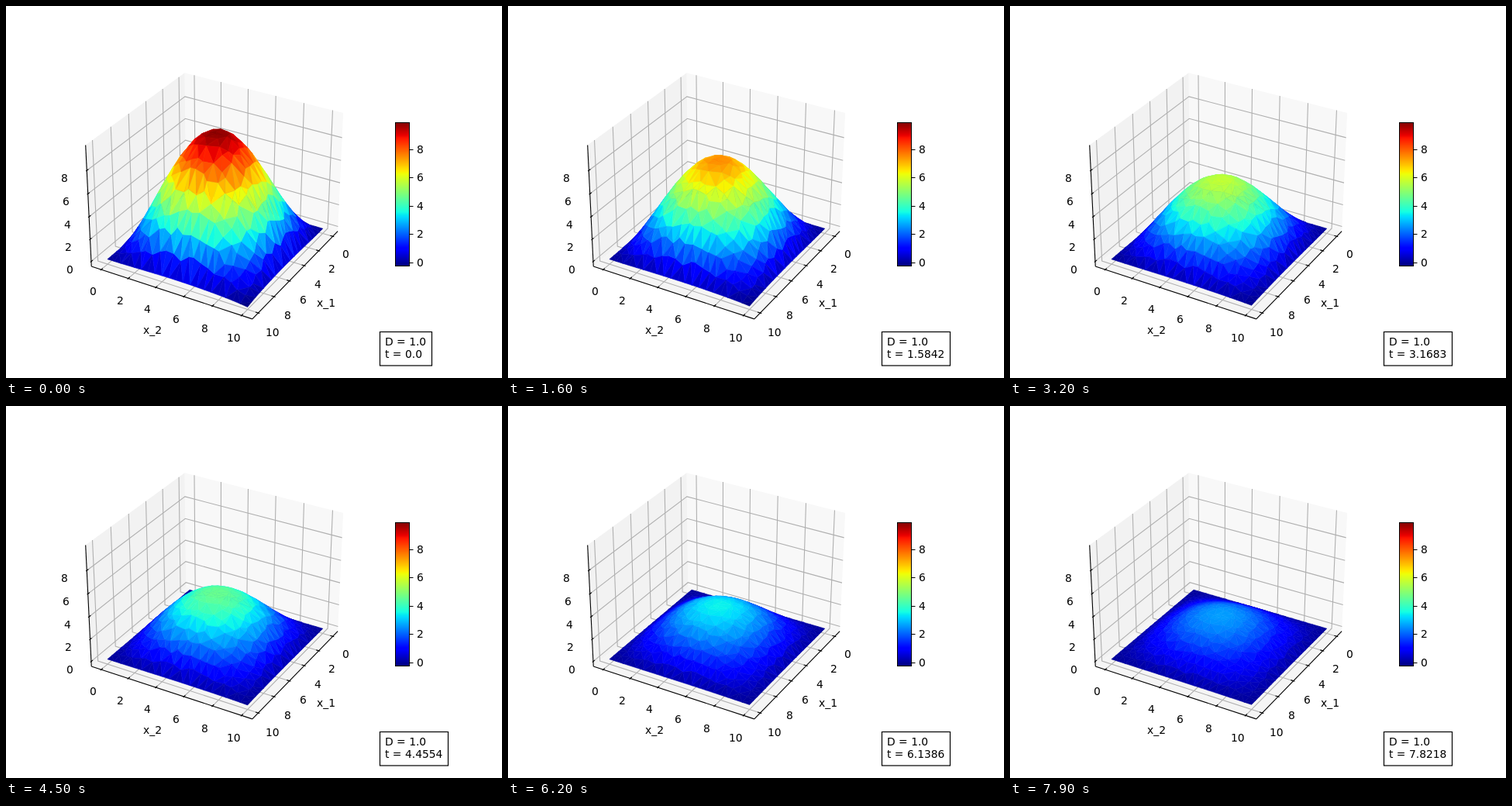
Write an HTML page with a canvas that moves like this. It is 640x480 px and loops after 8000 ms.

```html
<!DOCTYPE html>
<html lang="en">
<head>
<meta charset="utf-8">
<title>Diffusion surface</title>
<style>
  html, body { margin: 0; width: 640px; height: 480px; overflow: hidden; background: #fff; }
  svg, canvas { position: absolute; left: 0; top: 0; display: block; }
  text { font: 13.89px "DejaVu Sans", sans-serif; fill: #000; white-space: pre; }
</style>
</head>
<body>
<svg id="plot" width="640" height="480" viewBox="0 0 640 480"></svg>
<canvas id="surface" width="640" height="480"></canvas>
<script>
const LOOP = 8000, STEP = 100, DT = 10 / 101;
const Z_MIN = -0.24, Z_MAX = 9.92, Z_SPAN = Z_MAX - Z_MIN;
const SIDE = 8 / 7, HEIGHT = 6 / 7;             // box proportions 4 : 4 : 3
const H = SIDE / 2 * 25 / 24, HZ = HEIGHT / 2 * 25 / 24;
const CX = 272.1, CY = 237.4, SCALE = 1997.8;

// ---- projection: elevation 30, azimuth 30, eye distance 10
const C = Math.sqrt(3) / 2;
function project(x, y, z) {
  const depth = 10 - (C * C * x + C / 2 * y + z / 2);
  return [
    CX + SCALE * (C * y - x / 2) / depth,
    CY - SCALE * (C * z - C / 2 * x - y / 4) / depth,
    depth
  ];
}
const boxXY = v => (v - 5) / 11 * SIDE;         // limits -0.5 to 10.5
const boxZ = v => ((v - Z_MIN) / Z_SPAN - 0.5) * HEIGHT;

// ---- jet colour map
const JET = [
  [[0, 0], [0.35, 0], [0.66, 1], [0.89, 1], [1, 0.5]],
  [[0, 0], [0.125, 0], [0.375, 1], [0.64, 1], [0.91, 0], [1, 0]],
  [[0, 0.5], [0.11, 1], [0.34, 1], [0.65, 0], [1, 0]]
];
function ramp(stops, f) {
  let i = 1;
  while (i < stops.length - 1 && f > stops[i][0]) i++;
  const [a, va] = stops[i - 1], [b, vb] = stops[i];
  return va + (vb - va) * (f - a) / (b - a);
}
function jet(value) {
  const f = Math.min(1, Math.max(0, (value - Z_MIN) / Z_SPAN));
  return `rgb(${JET.map(s => Math.round(255 * ramp(s, f)))})`;
}

// ---- static drawing
const svg = document.getElementById('plot');
function add(tag, attrs, text) {
  const el = document.createElementNS('http://www.w3.org/2000/svg', tag);
  for (const k in attrs) el.setAttribute(k, attrs[k]);
  if (text !== undefined) el.textContent = text;
  svg.appendChild(el);
  return el;
}
const path = pts => pts.map(p => project(...p).slice(0, 2).map(v => v.toFixed(2)).join()).join(' ');
const line = (pts, stroke) =>
  add('polyline', { points: path(pts), fill: 'none', stroke, 'stroke-width': 1.11 });
const pane = (pts, fill) => add('polygon', { points: path(pts), fill });
const label = (x, y, text) => add('text', { x, y }, text);

// Text centred on a point in the box, snapped to whole pixels.
function label3d(point, drop, text) {
  const [x, y] = project(...point);
  const el = label(0, Math.round(y + drop), text);
  el.setAttribute('x', Math.round(x - el.getComputedTextLength() / 2));
}

function drawAxes() {
  pane([[-H, -H, -HZ], [-H, H, -HZ], [-H, H, HZ], [-H, -H, HZ]], '#f8f8f8');
  pane([[-H, -H, -HZ], [H, -H, -HZ], [H, -H, HZ], [-H, -H, HZ]], '#f2f2f2');
  pane([[-H, -H, -HZ], [H, -H, -HZ], [H, H, -HZ], [-H, H, -HZ]], '#f5f5f5');

  const ticks = [0, 2, 4, 6, 8, 10], grey = '#b0b0b0';
  for (const t of ticks) {
    const p = boxXY(t);
    line([[p, H, -HZ], [p, -H, -HZ], [p, -H, HZ]], grey);
    line([[H, p, -HZ], [-H, p, -HZ], [-H, p, HZ]], grey);
    if (t < 10) line([[H, -H, boxZ(t)], [-H, -H, boxZ(t)], [-H, H, boxZ(t)]], grey);
  }

  line([[H, H, -HZ], [-H, H, -HZ]], '#000');
  line([[H, -H, -HZ], [H, H, -HZ]], '#000');
  line([[H, -H, -HZ], [H, -H, HZ]], '#000');

  const out = H + SIDE / 120, inn = H - SIDE / 60;
  const away = k => [H + k * SIDE / 12, -HZ - k * HEIGHT / 12];
  const [far, low] = away(1.037), [nameFar, nameLow] = away(2.255);
  for (const t of ticks) {
    const p = boxXY(t), z = boxZ(t);
    line([[p, out, -HZ], [p, inn, -HZ]], '#000');
    line([[out, p, -HZ], [inn, p, -HZ]], '#000');
    label3d([p, far, low], 11, t);
    label3d([far, p, low], 11, t);
    if (t < 10) {
      line([[out, -H, z], [inn, -H, z]], '#000');
      label3d([far, -far, z], 11, t);
    }
  }
  label3d([0, nameFar, nameLow], 4.5, 'x_1');
  label3d([nameFar, 0, nameLow], 4.5, 'x_2');
}

function drawColorbar() {
  const top = 150, bottom = 335, size = bottom - top;
  for (let y = top; y < bottom; y++) {
    const value = Z_MAX - (y + 0.5 - top) / size * Z_SPAN;
    add('rect', { x: 502, y, width: 18, height: 1, fill: jet(value), 'shape-rendering': 'crispEdges' });
  }
  add('rect', { x: 502.5, y: 150.5, width: 18, height: 185, fill: 'none', stroke: '#000' });
  for (let v = 0; v <= 8; v += 2) {
    const row = Math.round(bottom - (v - Z_MIN) / Z_SPAN * size);
    add('line', { x1: 520.5, x2: 525.5, y1: row + 0.5, y2: row + 0.5, stroke: '#000' });
    label(530, row + 5, v);
  }
}

drawAxes();
drawColorbar();
const frameBox = add('rect', { x: 482.5, y: 420.5, height: 43.5, fill: '#fff', stroke: '#000', 'stroke-width': 1.2 });
const infoD = label(489, 438, 'D = 1.0');
const infoT = label(489, 454, '');

// ---- triangulated mesh
let seed = 11;
function rand() {
  seed = (seed * 16807) % 2147483647;
  return seed / 2147483647;
}

// Square rings from the border inwards, each slightly more irregular.
function makePoints() {
  const pts = [], rowGap = 0.56, spacing = 0.5;
  for (let k = 0; k < 9; k++) {
    const half = 5 - k * rowGap, n = Math.round(2 * half / spacing);
    const wobble = k && 0.08 + 0.02 * k;
    const shake = () => (rand() - 0.5) * 2 * wobble;
    for (let i = 0; i < n; i++) {
      const a = -half + 2 * half * i / n;
      for (const [x, y] of [[a, -half], [half, a], [-a, half], [-half, -a]])
        pts.push([5 + x + shake(), 5 + y + shake()]);
    }
  }
  pts.push([5.03, 4.98]);
  return pts;
}

function circle(pts, a, b, c) {
  const [ax, ay] = pts[a];
  const bx = pts[b][0] - ax, by = pts[b][1] - ay;
  const cx = pts[c][0] - ax, cy = pts[c][1] - ay;
  const d = 2 * (bx * cy - by * cx), bb = bx * bx + by * by, cc = cx * cx + cy * cy;
  const ux = (cy * bb - by * cc) / d, uy = (bx * cc - cx * bb) / d;
  return { v: [a, b, c], x: ax + ux, y: ay + uy, r: ux * ux + uy * uy };
}

// Bowyer-Watson Delaunay triangulation
function triangulate(points) {
  const n = points.length;
  const pts = points.concat([[-3000, -2000], [3100, -2100], [40, 4000]]);
  let tris = [circle(pts, n, n + 1, n + 2)];
  for (let p = 0; p < n; p++) {
    const [x, y] = pts[p], rim = new Map(), keep = [];
    for (const t of tris) {
      if ((x - t.x) ** 2 + (y - t.y) ** 2 >= t.r) { keep.push(t); continue; }
      t.v.forEach((a, i) => {
        const b = t.v[(i + 1) % 3], key = Math.min(a, b) * 1000 + Math.max(a, b);
        rim.has(key) ? rim.delete(key) : rim.set(key, [a, b]);
      });
    }
    for (const [a, b] of rim.values()) keep.push(circle(pts, a, b, p));
    tris = keep;
  }
  return tris.map(t => t.v).filter(v => Math.max(...v) < n);
}

const points = makePoints();
const triangles = triangulate(points);

// ---- decaying concentration, with a faint early ripple at the near edges
function level(x, y, t) {
  const sx = Math.sin(Math.PI * x / 10), sy = Math.sin(Math.PI * y / 10);
  const ex = (x / 10) ** 8, ey = (y / 10) ** 8;
  const ripple = 0.1 * (ex * sy * sy + ey * sx * sx) - 0.24 * ex * ey;
  return Z_MAX * Math.exp(-0.17 * t) * sx * sy + ripple * Math.exp(-0.3 * t);
}

const ctx = document.getElementById('surface').getContext('2d');
ctx.lineWidth = 0.6;
ctx.lineJoin = 'round';

function drawSurface(t) {
  const verts = points.map(([x, y]) => {
    const z = level(x, y, t);
    return [...project(boxXY(x), boxXY(y), boxZ(z)), z];
  });
  const faces = triangles.map(v => {
    const p = v.map(i => verts[i]);
    const mean = k => (p[0][k] + p[1][k] + p[2][k]) / 3;
    return { p, depth: mean(2), value: mean(3) };
  }).sort((a, b) => b.depth - a.depth);

  ctx.clearRect(0, 0, 640, 480);
  for (const { p, value } of faces) {
    ctx.fillStyle = ctx.strokeStyle = jet(value);
    ctx.beginPath();
    for (const [x, y] of p) ctx.lineTo(x, y);
    ctx.closePath();
    ctx.fill();
    ctx.stroke();
  }
}

function drawInfo(t) {
  const num = String(parseFloat(t.toFixed(4)));
  infoT.textContent = 't = ' + (num.includes('.') ? num : num + '.0');
  const width = Math.max(infoD.getComputedTextLength(), infoT.getComputedTextLength());
  frameBox.setAttribute('width', Math.round(width + 13.6));
}

let shown = -1;
const start = performance.now();
function tick(now) {
  const n = Math.floor((Math.max(0, now - start) % LOOP) / STEP);
  if (n !== shown) {
    shown = n;
    drawSurface(n * DT);
    drawInfo(n * DT);
  }
  requestAnimationFrame(tick);
}
tick(start);
</script>
</body>
</html>
```
